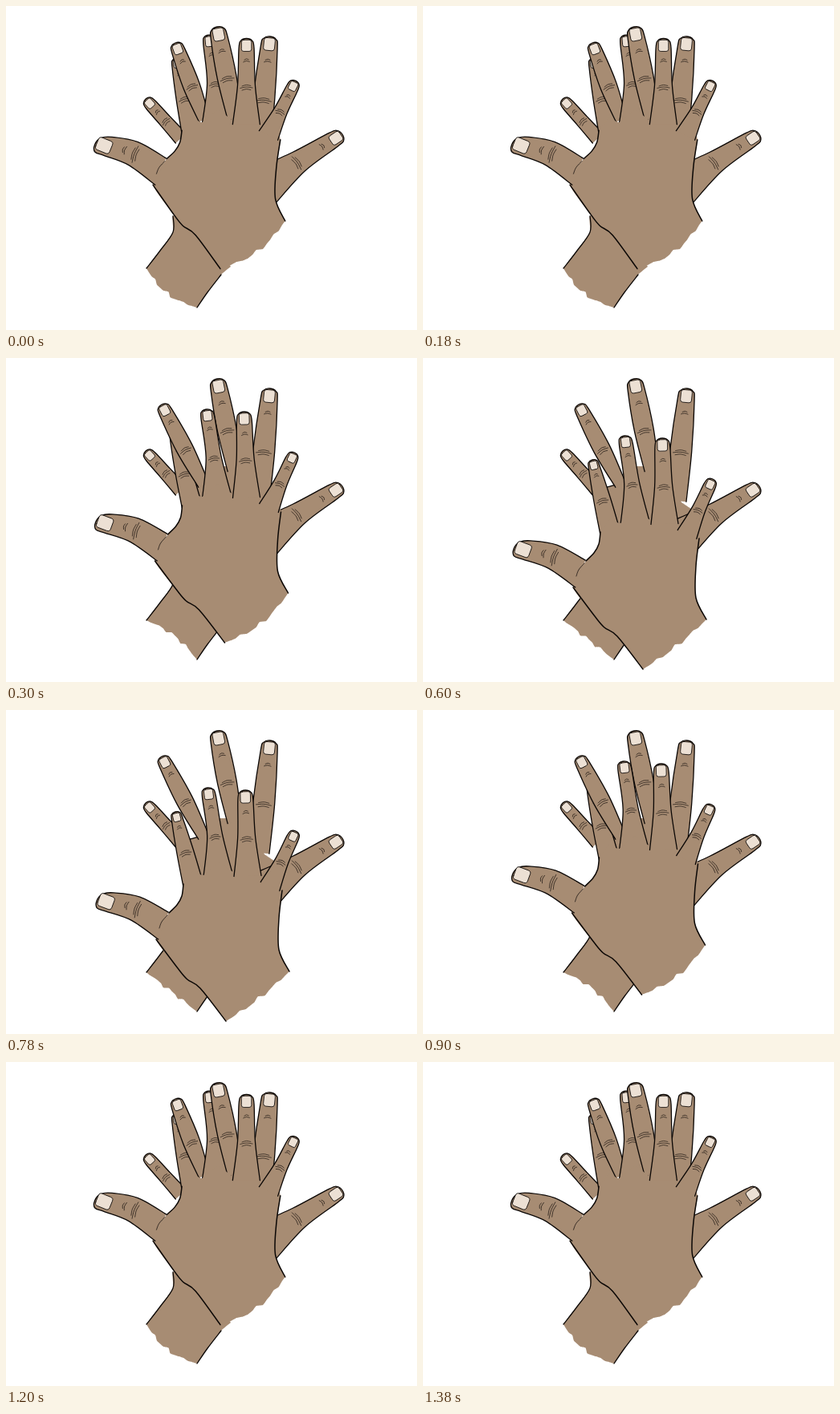
Write an HTML page with a canvas that moves like this. It is 512x404 px and loops after 1.5 s.

```html
<!DOCTYPE html>
<html lang="en">
<head>
<meta charset="utf-8">
<title>Hands</title>
<style>
html, body { margin: 0; height: 100%; overflow: hidden; background: #fff; }
canvas { display: block; }
</style>
</head>
<body>
<canvas id="stage" width="512" height="404"></canvas>
<script>
const ctx = document.getElementById('stage').getContext('2d');
const SKIN = '#a78c73', NAIL = '#ece0d4', INK = '#0b0705';
const STEP = 300, ORDER = [0, 1, 2, 1, 0];

// The upper hand slides and tilts as one piece; the fingers interlace anew each time.
const poses = [
  { x: -2, y: -61, tilt: 0.03, wristBulge: 9, hemBulge: 10,
    reach: { tip: [211, 46], base: [247, 142] },
    layers: ['upperIndex', 'lowerIndex', 'upperMiddle', 'lowerMiddle'] },
  { x: -1.5, y: -33, tilt: 0, wristBulge: -6, hemBulge: 9,
    reach: { tip: [194, 58], base: [246, 158] },
    layers: ['lowerMiddle', 'upperIndex', 'lowerIndex', 'upperMiddle'] },
  { x: 0, y: 0, tilt: 0, wristBulge: 0, hemBulge: 3,
    reach: { tip: [194, 58], base: [246, 158] },
    layers: ['lowerMiddle', 'lowerIndex', 'upperIndex', 'upperMiddle'] }
];

// Half widths at tip, middle and base; bow bends the finger sideways.
const fingers = {
  lowerThumb: { tip: [419, 160], base: [322, 225], width: [10, 14, 25], bow: -2 },
  lowerPinky: { tip: [174, 116], base: [218, 165], width: [7.5, 8, 9] },
  lowerRing: { tip: [329, 38], base: [315, 178], width: [10.5, 13.5, 13] },
  lowerMiddle: { tip: [263, 26], base: [285, 140], width: [10.5, 12, 9] },
  lowerIndex: { width: [8.5, 10.5, 7] },
  upperThumb: { tip: [113, 238], base: [196, 269], width: [12.5, 15.5, 18], bow: 8 },
  upperIndex: { tip: [211, 127], base: [233, 217], width: [7, 10.5, 12.5] },
  upperMiddle: { tip: [251, 97], base: [264, 205], width: [8.5, 9.5, 18], bow: 2 },
  upperRing: { tip: [298, 100], base: [301, 207], width: [9.5, 11, 17] },
  upperPinky: { tip: [361, 151], base: [329, 220], width: [7.5, 8.5, 13] }
};

// Smooth curve through the points; bend 0 gives straight edges.
function trace(p, bend = 1 / 6) {
  const at = i => p[Math.max(0, Math.min(p.length - 1, i))];
  ctx.beginPath();
  ctx.moveTo(...p[0]);
  for (let i = 0; i < p.length - 1; i++) {
    const [a, b, c, d] = [at(i - 1), at(i), at(i + 1), at(i + 2)];
    ctx.bezierCurveTo(
      b[0] + (c[0] - a[0]) * bend, b[1] + (c[1] - a[1]) * bend,
      c[0] - (d[0] - b[0]) * bend, c[1] - (d[1] - b[1]) * bend, ...c);
  }
}

function fill(p, bend) {
  trace(p, bend);
  ctx.fillStyle = SKIN;
  ctx.fill();
}

function ink(p, width = 1.3) {
  trace(p);
  ctx.lineWidth = width;
  ctx.strokeStyle = INK;
  ctx.stroke();
}

// Bowed lines across a finger, centred on x, y.
function crease(x, y, half, count) {
  for (let i = 0; i < count; i++) {
    const ly = y + (i - 1) * 2.6, w = half * (1 - Math.abs(i - 1) * 0.3);
    ink([[x - w, ly + 1], [x, ly - 0.5], [x + w, ly + 0.5]], 0.6);
  }
}

// Drawn in its own frame: the tip is the origin and y runs to the base.
function finger({ tip, base, width: [wt, wm, wb], bow = 0 }) {
  const dx = base[0] - tip[0], dy = base[1] - tip[1], len = Math.hypot(dx, dy);
  const axis = y => bow * Math.sin(Math.PI * y / len);
  const half = [[wb, len], [wm, len * 0.55], [wt, wt * 1.3], [wt * 0.75, wt * 0.3]];
  const side = s => half.map(([w, y]) => [axis(y) + s * w, y]);
  const outline = [...side(-1), [0, 0], ...side(1).reverse()];
  ctx.save();
  ctx.translate(...tip);
  ctx.rotate(Math.atan2(dy, dx) - Math.PI / 2);
  fill(outline);
  ink(outline);

  ctx.beginPath();
  ctx.roundRect(axis(wt) - wt * 0.66, 1.8, wt * 1.32, wt * 1.5, wt * 0.3);
  ctx.fillStyle = NAIL;
  ctx.fill();
  ctx.lineWidth = 0.8;
  ctx.stroke();

  const knuckle = len * 0.57;
  crease(axis(knuckle), knuckle, wm * 0.7, 3);
  crease(axis(wt * 3), wt * 3, wt * 0.4, 2);
  ctx.restore();
}

// Ragged edge from a to b, pushed outwards by bulge.
function hem([ax, ay], [bx, by], bulge) {
  const dx = bx - ax, dy = by - ay, len = Math.hypot(dx, dy);
  return Array.from({ length: 15 }, (_, i) => {
    const t = i / 14;
    const out = Math.sin(Math.PI * t) * (bulge + 1.8 * Math.sin(t * 23) + Math.sin(t * 41 + bulge));
    return [ax + dx * t - dy / len * out, ay + dy * t + dx / len * out];
  });
}

function lowerHand(bulge) {
  const left = [[208, 262], [208, 282], [192, 305], [175, 327]];
  const right = [[238, 376], [251, 357], [268, 335]];
  fill([[230, 250], ...left, ...hem(left[3], right[0], bulge), ...right, [280, 325]], 0.08);
  ink(left);
  ink(right);
  const web = [[217, 163], [229, 161], [240, 158]];
  fill([...web, [264, 135], [290, 135], [310, 150], [322, 180], [337, 190], [330, 235], [235, 250]], 0);
  ink(web);
  ['Thumb', 'Pinky', 'Ring'].forEach(name => finger(fingers['lower' + name]));
}

function palm(bulge) {
  const web = [[221, 217], [219, 232], [213, 243], [203, 253]];
  const left = [[187, 286], [214, 322], [226, 336], [242, 347], [274, 388]];
  const right = [[353, 326], [340, 299], [340, 260], [344, 225]];
  const top = [[336, 208], [319, 212], [301, 190], [284, 202], [265, 190], [246, 206], [233, 200]];
  fill([...web, ...left, ...hem(left[4], right[0], bulge), ...right, ...top], 0.08);
  [web, left, right].forEach(line => ink(line, 1.5));
}

function draw(pose) {
  const onHand = paint => {
    ctx.save();
    ctx.translate(250 + pose.x, 220 + pose.y);
    ctx.rotate(pose.tilt);
    ctx.translate(-250, -220);
    paint();
    ctx.restore();
  };
  ctx.fillStyle = '#fff';
  ctx.fillRect(0, 0, 512, 404);
  lowerHand(pose.wristBulge);
  for (const name of pose.layers) {
    const paint = () => finger(name === 'lowerIndex' ? { ...fingers[name], ...pose.reach } : fingers[name]);
    name.startsWith('upper') ? onHand(paint) : paint();
  }
  onHand(() => {
    palm(pose.hemBulge);
    ['Ring', 'Pinky', 'Thumb'].forEach(name => finger(fingers['upper' + name]));
    ink([[191, 272], [194, 264], [201, 256]], 0.7);
  });
}

const start = performance.now();
function tick() {
  const step = Math.floor((performance.now() - start) / STEP);
  draw(poses[ORDER[step % ORDER.length]]);
  requestAnimationFrame(tick);
}
ctx.lineCap = ctx.lineJoin = 'round';
tick();
</script>
</body>
</html>
```
